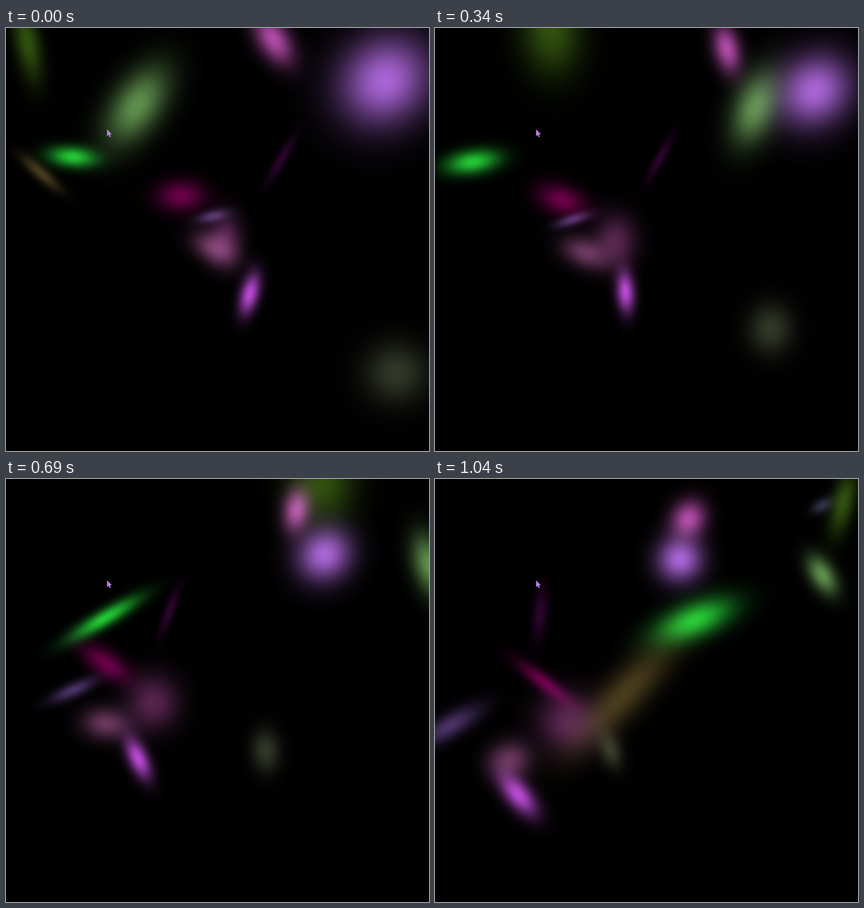
These frames come from a looping animation (748x748 px, 1110 ms). An HTML page:

```html
<!DOCTYPE html>
<html lang="en">
<head>
<meta charset="utf-8">
<title>Drifting lights</title>
<style>
  html, body { margin: 0; width: 100%; height: 100%; overflow: hidden; background: #000; }
  svg { display: block; width: 100vw; height: 100vh; isolation: isolate; }
  ellipse { mix-blend-mode: screen; }
</style>
</head>
<body>
<svg viewBox="0 0 748 748">
  <defs id="defs"></defs>
  <rect width="748" height="748"/>
  <g id="lights"></g>
  <path d="M178.7 179v12.4l2.8-2.5 2 4.2 2-.9-1.9-4.1h3.6z" fill="#b983e2"/>
</svg>
<script>
const NS = 'http://www.w3.org/2000/svg';
const LOOP = 1110, STEP = 70, LAST = 14;
const FALLOFF = 2, SPREAD = 1.6; // glow strength is exp(-FALLOFF d²), cut off at d = SPREAD

const defs = document.getElementById('defs');
const group = document.getElementById('lights');
const lights = [];

function add(parent, tag, attrs) {
  const el = document.createElementNS(NS, tag);
  for (const name in attrs) el.setAttribute(name, attrs[name]);
  return parent.appendChild(el);
}

// A glowing ellipse drifting smoothly through a few evenly spaced poses:
// [centre x, centre y, radius along axis, radius across, axis angle]
function light(color, ...poses) {
  const id = 'glow' + lights.length, stops = 24;
  const gradient = add(defs, 'radialGradient', { id });
  for (let k = 0; k <= stops; k++) {
    const d = k / stops * SPREAD;
    const opacity = k < stops ? Math.exp(-FALLOFF * d * d) : 0;
    add(gradient, 'stop', { offset: k / stops, 'stop-color': color, 'stop-opacity': opacity });
  }
  lights.push({ poses, el: add(group, 'ellipse', { fill: `url(#${id})` }) });
}

light('#30500f', [38, 25, 95, 31, 79], [250, 2, 108, 76, 87], [580, 8, 95, 76, 96], [722, 42, 80, 28, 104]);
light('#483c1c', [62, 257, 60, 16, 41], [-80, 305, 62, 18, 68], [-78, 337, 105, 24, 110], [335, 380, 172, 50, 133]);
light('#323828', [690, 610, 77, 73, 0], [515, 495, 41, 55, 0], [311, 480, 27, 47, -18]);
light('#56244e', [388, 372, 40, 60, 0], [280, 386, 58, 65, 0], [232, 428, 71, 70, 0]);
light('#68365c', [368, 390, 58, 35, 30], [207, 415, 58, 37, 12], [132, 497, 52, 45, -15]);
light('#6a0048', [310, 297, 58, 38, 0], [188, 316, 63, 33, 30], [193, 360, 78, 20, 38]);
light('#4a3266', [365, 333, 38, 14, -12], [165, 356, 52, 15, -22], [25, 437, 85, 28, -30]);
light('#2c042e', [487, 232, 64, 13, -60], [332, 232, 62, 12, -66], [186, 238, 64, 18, -84]);
light('#b848d2', [431, 470, 52, 23, -75], [273, 479, 52, 23, -107], [147, 558, 62, 30, -130]);
light('#22c834', [118, 228, 58, 25, 5], [72, 236, 64, 28, -6], [93, 242, 80, 25, -25],
  [262, 249, 103, 19, -31], [459, 250, 98, 42, -22]);
light('#b04aa6', [473, 20, 68, 38, 58], [522, 48, 55, 31, 90], [448, 71, 48, 41, 118]);
light('#a864d4', [670, 93, 116, 103, -40], [662, 114, 91, 80, -40], [554, 135, 67, 62, -40], [433, 142, 56, 55, -40]);
light('#5e8f4c', [232, 137, 106, 59, -56], [605, 142, 90, 50, -74], [752, 152, 75, 39, -107], [685, 170, 53, 30, -122]);
light('#302e44', [1050, -60, 28, 16, -28], [886, -10, 28, 16, -28], [684, 47, 28, 16, -28]);

// Polynomial through all poses, with u running from 0 to 1
function blend(poses, u) {
  const s = u * (poses.length - 1);
  const weights = poses.map((_, i) =>
    poses.reduce((w, _, j) => j === i ? w : w * (s - j) / (i - j), 1));
  return poses[0].map((_, k) =>
    poses.reduce((sum, pose, i) => sum + weights[i] * pose[k], 0));
}

// Motion advances in steps; the second one is held longer
function stepAt(ms) {
  if (ms < 200) return ms < STEP ? 0 : 1;
  return Math.min(LAST, 2 + Math.floor((ms - 200) / STEP));
}

function render(ms) {
  const u = stepAt(ms) / LAST;
  for (const { el, poses } of lights) {
    const [x, y, along, across, angle] = blend(poses, u);
    el.setAttribute('rx', along * SPREAD);
    el.setAttribute('ry', across * SPREAD);
    el.setAttribute('transform', `translate(${x} ${y}) rotate(${angle})`);
  }
}

const start = performance.now();
function tick() {
  render((performance.now() - start) % LOOP);
  requestAnimationFrame(tick);
}
tick();
</script>
</body>
</html>
```
